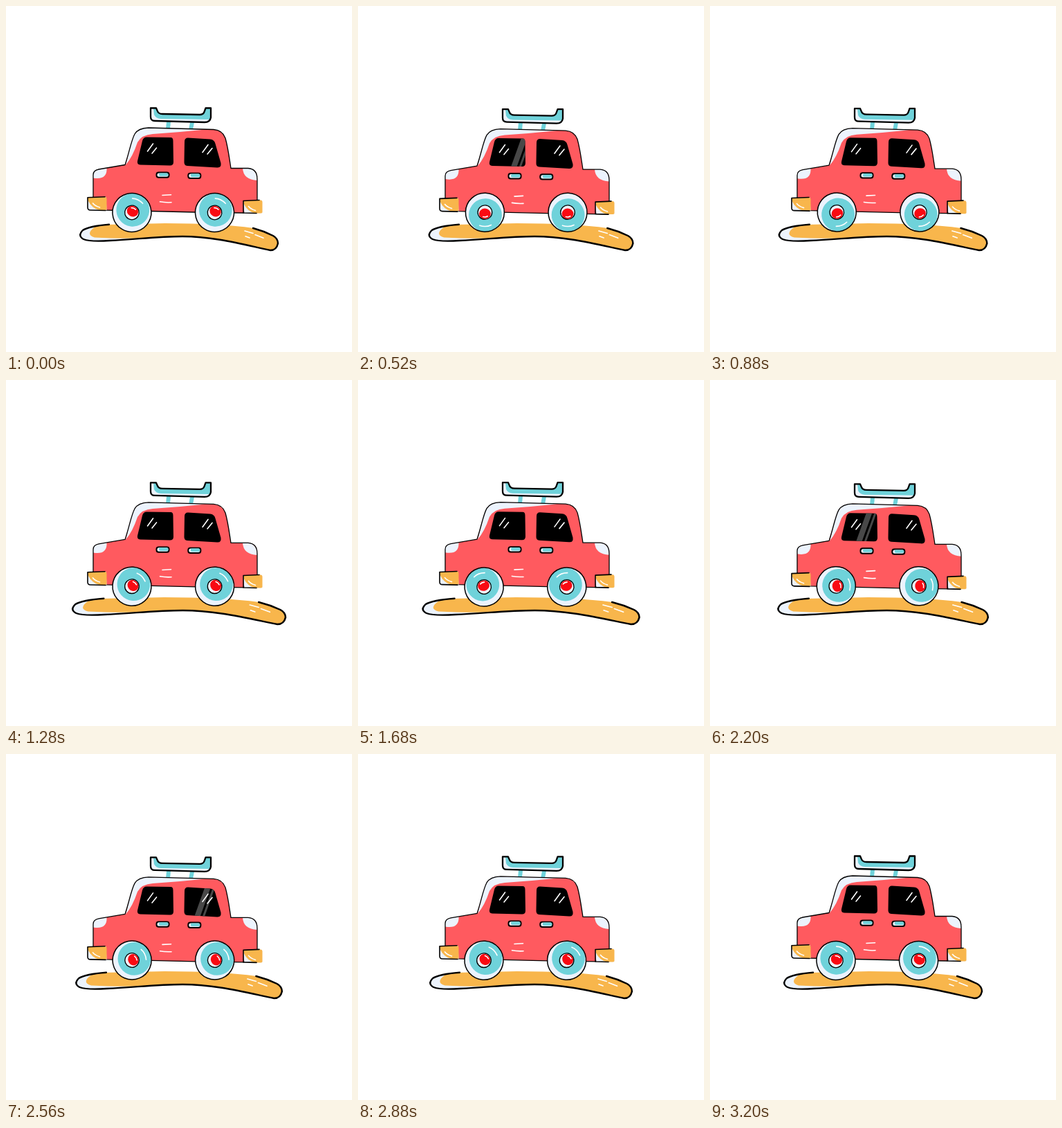
These frames come from a looping animation (500 by 500 pixels, 3280 ms). An HTML page:

```html
<!DOCTYPE html>
<html lang="en">
<head>
<meta charset="utf-8">
<title>Road trip</title>
<style>
  html, body { margin: 0; width: 100%; height: 100%; overflow: hidden; background: #fff; }
  svg { display: block; width: 100vw; height: 100vh; }
  .line { fill: none; stroke: #000; stroke-linecap: round; stroke-linejoin: round; }
  .shine { fill: none; stroke: #fff; stroke-width: 1.6; stroke-linecap: round; }
  .red { fill: #ff5a5f; }
  .teal { fill: #6fd2da; }
  .gold { fill: #f8b64c; }
  .pale { fill: #ecf3fd; }
</style>
</head>
<body>
<svg viewBox="0 0 500 500">
  <defs>
    <path id="glassL" d="M203 189.500L238 190Q241.500 190 241.500 195L242 225.500Q242 230.500 237 230.500L194 229.500Q189 229 190 224L197 195Q198.500 189.500 203 189.500Z"/>
    <path id="glassR" d="M263 190.500L295 192.500Q301 193 302.500 199L310.500 227Q311.500 234 305 233.500L262 231Q257 230.500 257.500 225L258 196Q258 190.500 263 190.500Z"/>
    <path id="rack" d="M209 147.500L209 160Q209 166 215 166L287 168Q295 168 296 161L296 147.500L288.500 147.500L286.500 153Q285 157 280 157L226 156Q220 156 218.500 151L217 147.500Z"/>
    <path id="body" d="M126 278L126 244Q126 237.500 134 236L172 229.500C178 212 181 194 186 185Q191 176.500 206 176L300 178.500Q313 179.500 317 191C321 205 323 222 325 234.500L350 234.500Q363 235.500 363 250L363 282L343 299L274 298L145 295Z"/>
    <clipPath id="glass"><use href="#glassL"/><use href="#glassR"/></clipPath>
    <clipPath id="rackClip"><use href="#rack"/></clipPath>
    <g id="wheel">
      <circle r="28" class="pale"/>
      <circle cx="-0.700" cy="-3.900" r="23.900" class="teal"/>
      <circle r="28" class="line" stroke-width="1.500"/>
      <path class="shine" d="M-9.500 -18Q-2 -22 7 -19.200"/>
      <circle r="10.300" class="pale"/>
      <ellipse cy="-2" rx="8.400" ry="7.600" fill="#f90a12"/>
      <circle r="10.300" class="line" stroke-width="1.300"/>
      <path class="shine" stroke-width="1" d="M-4 -5.500Q-1 -7.500 2.500 -6.500"/>
    </g>
    <g id="handle">
      <rect width="20" height="9.300" rx="4" fill="#000"/>
      <rect x="2" y="1.900" width="16" height="5.400" rx="2.500" class="pale"/>
      <rect x="4.500" y="1.900" width="13.500" height="4.400" rx="2" class="teal"/>
    </g>
    <g id="bumper">
      <path class="pale" d="M0 1L27 0L28 19L2 19Z"/>
      <path class="gold" d="M0 1L25 0Q28 0 28 3L28 17Q28 19 25 19L17 19Q6 16 1 5Z"/>
      <path class="shine" d="M8 9Q11 13 18 15"/>
    </g>
  </defs>

  <g id="road">
    <path class="gold" d="M144 316Q120 318 111 324Q103 332 112 337Q122 341 150 339C190 337 220 333 255 333C300 333 340 344 382 353Q391 353 393 343Q393 336 386 332Q372 325 357 321Q310 314 230 314Z"/>
    <path class="pale" d="M130 318Q115 320 111 324Q103 332 112 337Q122 341 150 339L205 335.500Q160 336.500 128 334.500Q113 330 130 318Z"/>
    <path class="line" stroke-width="2.400" d="M149 315.700Q120 318 111 324Q103 332 112 337Q122 341 150 339C190 337 220 333 255 333C300 333 340 344 382 353Q391 353 393 343Q393 336 386 332Q372 325 357 321"/>
    <path class="shine" d="M345 325L357 328.500M346 332.800L352 335M360 330.500L372 335.300"/>
  </g>

  <g id="car">
    <path class="teal" d="M232 167L238 167L237 178L231 178ZM266 168L272 168L270 179L264 179Z"/>
    <g clip-path="url(#rackClip)">
      <use href="#rack" class="pale"/>
      <path class="teal" d="M213 147L214 157Q216 162.500 224 163L296 164L296 145Z"/>
    </g>
    <use href="#rack" class="line" stroke-width="2.300"/>

    <use href="#body" class="red"/>
    <path class="pale" d="M173 229.500C178 212 181 194 186 185Q191 176.500 206 176L288 178.500Q250 182.500 212 185Q196 186 190 197Q183 218 173 229.500Z"/>
    <path class="pale" d="M126 248.500L126 244Q126 237.500 134 236L145.500 234Q146.500 252 126 248.500ZM342 234.500L350 234.500Q363 235.500 363 252Q343 251 342 234.500Z"/>
    <use href="#body" class="line" stroke-width="1.300"/>

    <use href="#glassL"/>
    <use href="#glassR"/>
    <g clip-path="url(#glass)">
      <g id="glint" fill="none" stroke="#484848">
        <path stroke-width="8" d="M9 -25L-9 25"/>
        <path stroke-width="3" d="M18 -25L0 25"/>
      </g>
    </g>
    <path class="shine" d="M204.500 210L212.500 199M211 213L217.500 205M284 211.500L292 200.500M291 214L298 205.500"/>
    <use href="#handle" x="216.500" y="239.500"/>
    <use href="#handle" x="262.300" y="240.700"/>
    <path class="shine" d="M226 273.500L238.500 272.800M222.500 282.800Q230 284.300 239 283.800"/>

    <use href="#bumper" x="117.500" y="276"/>
    <path class="line" stroke-width="1.600" d="M143 275.800L118 276.800L118 291Q118 295 122 295L144 295.500"/>
    <use href="#bumper" x="342.500" y="280.500"/>
    <path class="line" stroke-width="1.600" d="M366 280.500L343 281.500L343 299L362 299.500"/>
  </g>

  <use id="wheelL" href="#wheel"/>
  <use id="wheelR" href="#wheel"/>
</svg>
<script>
  const LOOP = 3280, TICK = 40, STEPS = 76;
  const part = id => document.getElementById(id);
  const [road, car, glint, wheelL, wheelR] =
    ['road', 'car', 'glint', 'wheelL', 'wheelR'].map(part);

  // 0 at the start of each period, 1 halfway through
  const swing = (i, period) => {
    const p = ((i / period) % 1 + 1) % 1;
    return 1 - Math.abs(1 - 2 * p);
  };
  const move = (el, value) => el.setAttribute('transform', value);

  // The wheels turn around a point slightly off their centres
  const spin = (el, x, y, angle) =>
    move(el, `translate(${x} ${y}) rotate(${angle}) translate(-0.7 0.35)`);

  function pose(i) {
    const stretch = 1 + 14 / 144 * swing(i, STEPS);
    const angle = 30 - 360 * 10 * i / STEPS;
    move(road, `translate(250 0) scale(${stretch} 1) translate(-250 0)`);
    move(car, `translate(0 ${3 * swing(i, STEPS / 8)})`);
    move(glint, `translate(${72 + 294.5 * swing(i - 32.65, STEPS)} 212)`);
    spin(wheelL, 182.7, 298.5, angle);
    spin(wheelR, 302.3, 298.5, angle);
  }

  const start = performance.now();
  function frame() {
    const tick = Math.floor((performance.now() - start) % LOOP / TICK);
    // Every twentieth step is held for two ticks
    pose(tick - Math.floor((tick + 19) / 20));
    requestAnimationFrame(frame);
  }
  frame();
</script>
</body>
</html>
```
